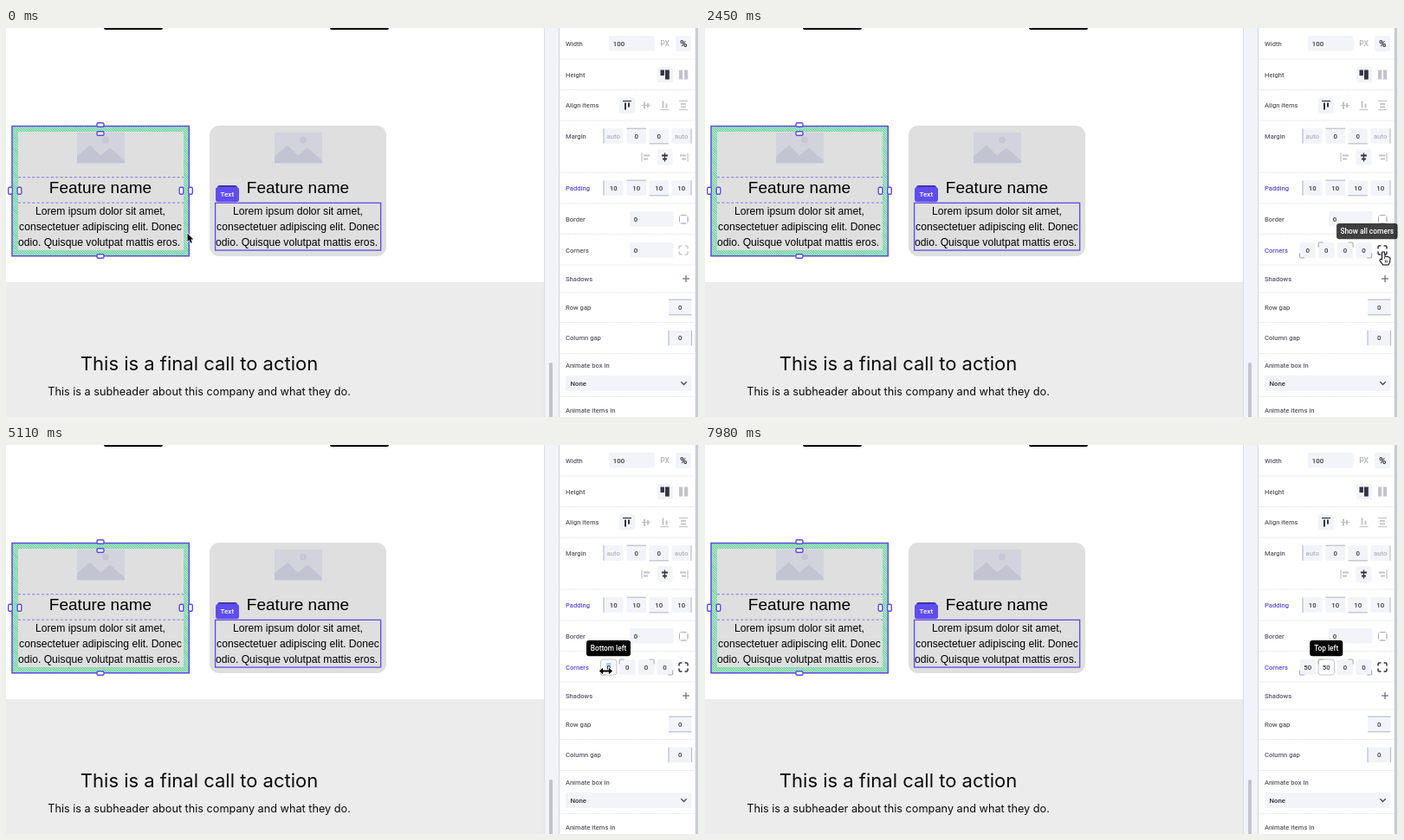
An HTML page with a canvas that plays this animation: 800x450 px, repeating every 8000 ms.

```html
<!DOCTYPE html>
<html lang="en">
<head>
<meta charset="utf-8">
<title>Corner settings</title>
<style>
html, body { margin: 0; width: 100%; height: 100%; overflow: hidden; background: #fff; }
canvas { display: block; width: 800px; height: 450px; }
</style>
</head>
<body>
<canvas id="stage"></canvas>
<script>
const LOOP = 8000;
const PURPLE = '#5b4be0', DARK = '#33343f', PALE = '#c3c4cb', FIELD = '#f3f4f9', EDGE = '#bcbdc8', CARD = '#dfdfdf';
const UI = 'Roboto, sans-serif', BODY = '"Liberation Sans", Arial, sans-serif', TITLE = 'Inter, sans-serif';

const canvas = document.getElementById('stage');
const dpr = window.devicePixelRatio || 1;
canvas.width = 800 * dpr;
canvas.height = 450 * dpr;
const c = canvas.getContext('2d');

const clamp = v => Math.max(0, Math.min(1, v));
const ramp = (t, a, b) => clamp((t - a) / (b - a));
const ease = p => p * p * (3 - 2 * p);
const mix = (a, b, p) => a + (b - a) * p;

function rect(x, y, w, h, fill) {
  c.fillStyle = fill;
  c.fillRect(x, y, w, h);
}

function box(x, y, w, h, r, fill, stroke, width = 1) {
  c.beginPath();
  c.roundRect(x, y, w, h, r);
  if (fill) { c.fillStyle = fill; c.fill(); }
  if (stroke) { c.strokeStyle = stroke; c.lineWidth = width; c.stroke(); }
}

function line(points, color, width = 1, dash = []) {
  c.beginPath();
  points.forEach(([x, y], i) => i ? c.lineTo(x, y) : c.moveTo(x, y));
  c.strokeStyle = color;
  c.lineWidth = width;
  c.setLineDash(dash);
  c.stroke();
  c.setLineDash([]);
}

function shape(points, fill, stroke, width = 1) {
  c.beginPath();
  points.forEach(([x, y], i) => i ? c.lineTo(x, y) : c.moveTo(x, y));
  c.closePath();
  c.lineJoin = 'round';
  if (stroke) { c.strokeStyle = stroke; c.lineWidth = width; c.stroke(); }
  c.fillStyle = fill;
  c.fill();
}

function text(s, x, y, font, color, align = 'center') {
  c.font = font;
  c.fillStyle = color;
  c.textAlign = align;
  c.fillText(s, x, y);
}

const label = (s, y, color = '#5a5b66') => text(s, 646, y + 2.7, '500 7.6px ' + UI, color, 'left');
const value = (s, x, y, color = DARK) => text(s, x, y + 2.8, '500 7.8px ' + UI, color);

// ---- page canvas ----

function placeholder(x, y) {
  c.save();
  c.beginPath();
  c.rect(x, y, 55, 36);
  c.clip();
  rect(x, y, 55, 36, '#d2d3dc');
  shape([[x, y + 36], [x, y + 28], [x + 15, y + 15], [x + 27, y + 27], [x + 38, y + 18], [x + 55, y + 33], [x + 55, y + 36]], '#c3c4d2');
  c.beginPath();
  c.arc(x + 33, y + 9, 4, 0, Math.PI * 2);
  c.fillStyle = '#c6c7d4';
  c.fill();
  c.restore();
}

function cardText(x) {
  text('Feature name', x, 190.7, '19px ' + BODY, '#000');
  ['Lorem ipsum dolor sit amet,', 'consectetuer adipiscing elit. Donec', 'odio. Quisque volutpat mattis eros.']
    .forEach((s, i) => text(s, x - (i === 2 ? 1.5 : 0), 215.9 + i * 18, '12.17px ' + BODY, '#000'));
}

function hatch() {
  c.save();
  c.beginPath();
  c.rect(7, 114, 204, 150);
  c.rect(14, 120, 191, 137);
  c.clip('evenodd');
  rect(7, 114, 204, 150, '#d3ebdd');
  for (let x = -150; x < 215; x += 2.8) line([[x, 114], [x + 150, 264]], '#63d39b', 1.1);
  c.restore();
}

function handle(x, y, w, h) {
  box(x - w / 2, y - h / 2, w, h, 1.5, '#fff', PURPLE, 1.4);
}

function page() {
  rect(0, 0, 622, 450, '#fff');
  box(113, -8, 68, 10, 2, '#000');
  box(374, -8, 68, 10, 2, '#000');
  rect(0, 294, 622, 156, '#ececec');

  rect(7, 114, 204, 150, CARD);
  placeholder(82, 120.5);
  hatch();
  box(7, 113.6, 204.3, 150.2, 0, null, PURPLE, 1.5);
  for (const y of [172.7, 202.2]) line([[14, y], [205, y]], '#8278e4', 1, [3, 2.4]);
  cardText(109);
  for (const y of [112, 122, 264]) handle(109, y, 8, 4.6);
  for (const x of [5, 15.5, 202.5, 213]) handle(x, 188.3, 4.6, 8);

  box(235, 113, 204, 151, 11, CARD);
  placeholder(310, 120.5);
  cardText(337);
  box(241.6, 202.4, 191, 54.8, 0, null, PURPLE, 1.3);
  box(244, 182, 23, 8, 2.5, '#4034a8');
  box(242, 184, 27, 17.2, 3, '#5f4df0');
  text('Text', 255.3, 195.4, '500 8px ' + UI, '#fff');

  text('This is a final call to action', 223, 396, '22px ' + TITLE, '#0c0c0c');
  text('This is a subheader about this company and what they do.', 223, 425, '12.7px ' + TITLE, '#0c0c0c');

  rect(621, 0, 17, 450, '#f2f3f9');
  rect(621, 0, 1, 450, '#dcdde5');
  box(627, 387, 4, 70, 2, '#c2c3cc');
  rect(638, 0, 1, 450, '#d3d4dd');
}

// ---- settings panel ----

// sides: any of l, t, b, r get a marker line
function field(x, y, w, s, sides = '', color = DARK) {
  box(x, y - 8.8, w, 17.6, 2, FIELD);
  const r = x + w, top = y - 8.8, end = y + 8.8;
  if (sides.includes('l')) line([[x, top], [x, end]], EDGE, 1.2);
  if (sides.includes('r')) line([[r, top], [r, end]], EDGE, 1.2);
  if (sides.includes('t')) line([[x, top], [r, top]], EDGE, 1.2);
  if (sides.includes('b')) line([[x, end], [r, end]], EDGE, 1.2);
  value(s, x + w / 2, y, color);
}

function sidesRow(y, values) {
  [690, 716.5, 742.5, 768.5].forEach((x, i) =>
    field(x, y, 22.5, values[i], 'ltbr'[i], values[i] === 'auto' ? '#b4b5bf' : DARK));
}

const chip = (x, y) => box(x - 9, y - 9, 18, 18, 2, FIELD);

// bars hang from, straddle or stand on a rule
function alignIcon(x, y, mode, color) {
  const bar = (bx, h) => {
    const by = mode === 'top' ? y - 3 : mode === 'low' ? y + 3 - h : y - h / 2;
    rect(x + bx, by, 2, h, color);
  };
  const rules = { top: [-5], mid: [0], low: [5], both: [-5, 5] }[mode];
  rules.forEach(d => rect(x - 5, y + d - .6, 10, 1.2, color));
  if (mode === 'both') { rect(x - 3, y - 2.5, 6, 1.8, color); rect(x - 3, y + 1, 6, 1.8, color); }
  else { bar(-3, 8); bar(1, 5); }
}

function sideIcon(x, y, dir, color) {
  rect(x + dir * 5 - .6, y - 5, 1.2, 10, color);
  [[7, -3], [5, 1]].forEach(([w, d]) => {
    const bx = dir < 0 ? x - 3 : dir > 0 ? x + 3 - w : x - w / 2;
    rect(bx, y + d, w, 2, color);
  });
}

function corner(x, y, sx, sy, size, color, width) {
  c.beginPath();
  c.moveTo(x, y - sy * size);
  c.lineTo(x, y - sy * 1.5);
  c.quadraticCurveTo(x, y, x - sx * 1.5, y);
  c.lineTo(x - sx * size, y);
  c.strokeStyle = color;
  c.lineWidth = width;
  c.stroke();
}

function brackets(x, y, color, width) {
  for (const sx of [-1, 1]) for (const sy of [-1, 1]) corner(x + sx * 5, y + sy * 5, sx, sy, 3.4, color, width);
}

function cornerFields(s) {
  const marks = [[-1, 1], [-1, -1], [1, -1], [1, 1]];
  marks.forEach(([sx, sy], i) => {
    const x = 695.7 + i * 21.6, y = 257, on = s.focus === i;
    box(x - 9.2, y - 9, 18.4, 18, 3, on ? '#fff' : FIELD, on ? '#c2c3ce' : s.hover === i ? '#d8d9e2' : null, 1);
    corner(x + sx * 9.2, y + sy * 9, sx, sy, 5.5, '#a9aab6', 1.1);
    if (s.selected === i) rect(x - 2.6, y - 5, 5.2, 10, '#a9cdfb');
    value(s.values[i], x, y);
  });
  brackets(782, 257, DARK, 1.5);
}

function panel(s) {
  rect(639, 0, 161, 450, '#fff');
  for (const y of [36, 71.5, 107, 167, 203, 238.5, 274, 306, 340.5, 376.5, 426.5])
    line([[639, y], [795, y]], '#e3e4ea', 1, [1.5, 1]);

  label('Width', 18);
  box(696, 9, 52.5, 17.5, 2, FIELD);
  value('100', 707.5, 18);
  text('PX', 760.5, 21.2, '500 8.6px ' + UI, '#b3b4be');
  chip(782, 18);
  text('%', 782.3, 22, '700 11.5px ' + UI, DARK);

  label('Height', 54);
  chip(761, 54);
  rect(755.5, 48.5, 4.4, 6.5, DARK);
  rect(761, 48.5, 4.8, 11, DARK);
  rect(777, 48.5, 4.2, 11, PALE);
  rect(783, 48.5, 4.2, 11, PALE);

  label('Align items', 89.5);
  chip(717, 89.5);
  alignIcon(717, 89.5, 'top', DARK);
  alignIcon(739, 89.5, 'mid', PALE);
  alignIcon(760.5, 89.5, 'low', PALE);
  alignIcon(782, 89.5, 'both', PALE);

  label('Margin', 125);
  sidesRow(125, ['auto', '0', '0', 'auto']);
  chip(760.5, 149.5);
  sideIcon(739, 149.5, -1, PALE);
  sideIcon(760.5, 149.5, 0, DARK);
  sideIcon(782, 149.5, 1, PALE);

  label('Padding', 185, PURPLE);
  sidesRow(185, ['10', '10', '10', '10']);

  label('Border', 221);
  box(720, 212, 50.5, 17.6, 2, FIELD);
  value('0', 727, 221);
  box(777.5, 216.5, 9.5, 9.5, 1.5, null, '#d9dae0', 1);
  for (const [x, y, w, h] of [[779.5, 216, 5.5, 1], [779.5, 225.5, 5.5, 1], [777, 218.5, 1, 5.5], [786.5, 218.5, 1, 5.5]])
    rect(x, y, w, h, '#a7a8b2');

  label('Corners', 257, s.open ? PURPLE : undefined);
  if (s.open) cornerFields(s);
  else {
    box(720, 248, 50.5, 17.6, 2, FIELD);
    value('0', 727, 257);
    brackets(782, 257, '#b5b6bf', 1.1);
  }

  label('Shadows', 290);
  rect(781, 289.4, 8, 1.2, '#6b6c77');
  rect(784.4, 286, 1.2, 8, '#6b6c77');

  label('Row gap', 323);
  field(765, 323, 26.5, '0', 'tb');
  label('Column gap', 358.5);
  field(765, 358.5, 26.5, '0', 'lr');

  label('Animate box in', 390.5);
  box(646, 402, 145.5, 18, 2, FIELD);
  text('None', 651.5, 413.8, '500 7.8px ' + UI, DARK, 'left');
  line([[779.3, 409.3], [782.5, 412.6], [785.7, 409.3]], '#4c4d58', 1.4);
  label('Animate items in', 442.5);

  rect(795, 0, 5, 450, '#f0f1f5');
  box(796, -4, 3, 458, 1.5, '#c9cad2');
}

function tooltip(s, x, w, alpha) {
  if (alpha <= 0) return;
  c.globalAlpha = alpha;
  box(x - w / 2, 226, w, 18.2, 3, '#000');
  c.globalAlpha = 1;
  c.save();
  c.globalAlpha = Math.min(1, alpha * 2);
  text(s, x, 238.1, '500 8.3px ' + UI, '#fff');
  c.restore();
}

// ---- pointer ----

const pointers = {
  arrow() {
    shape([[0, 0], [0, 9.6], [2.2, 7.7], [3.7, 11.2], [5.3, 10.5], [3.8, 7.1], [6.7, 6.9]], '#000', '#fff', 1.4);
  },
  press() {
    shape([[0, 0], [2.2, 13], [5.2, 9], [11.2, 7.6]], '#000', '#fff', 1.4);
  },
  hand() {
    shape([[-1, 0], [1, 0], [1.6, 5], [6.6, 6], [7.6, 7.4], [7, 11.4], [5.6, 14], [0, 14], [-3.6, 9.6], [-3, 8.2], [-1, 9]], '#fff', '#000', 2);
    for (const x of [2.4, 4.2]) line([[x, 9], [x, 12]], '#000', .8);
    line([[1.6, 5], [1.6, 7.4]], '#000', .8);
  },
  resize() {
    const pts = [[-7.6, 0], [-3.4, -3.8], [-3.4, -1], [3.4, -1], [3.4, -3.8], [7.6, 0], [3.4, 3.8], [3.4, 1], [-3.4, 1], [-3.4, 3.8]];
    shape(pts, '#000', '#fff', 1.4);
  }
};

function pointer(t) {
  if (t >= 7540) return;
  let x = mix(209.5, 785.5, ease(ramp(t, 140, 1120)));
  let y = mix(237.5, 250.5, ease(ramp(t, 140, 1120)));
  const back = ease(ramp(t, 2480, 3080));
  const next = ease(ramp(t, 5850, 6190));
  let kind = t < 1120 ? 'arrow' : t < 1540 ? 'press' : 'hand';
  if (t >= 1540) {
    x = mix(783, 692.5, back) + 26 * next;
    y = mix(259.5, 261.5, back);
    if (x < 773) kind = 'resize';
  }
  c.save();
  c.translate(x, y);
  pointers[kind]();
  c.restore();
}

function clickRing(t) {
  const p = ramp(t, 1190, 1500);
  if (p <= 0 || p >= 1) return;
  c.save();
  c.globalAlpha = Math.min(1, (1 - p) * 1.7);
  c.beginPath();
  c.arc(783.5, 251.5, 4 + 22 * (1 - (1 - p) ** 2.4), 0, Math.PI * 2);
  c.fillStyle = 'rgba(190,208,250,.16)';
  c.fill();
  c.strokeStyle = '#a9bdf0';
  c.lineWidth = 1.1;
  c.stroke();
  c.restore();
}

// ---- timeline ----

const typed = (t, a, b) => t < a ? '0' : t < b ? '5' : '50';

function state(t) {
  return {
    open: t >= 1470,
    focus: t >= 6860 ? 1 : t >= 3640 ? 0 : -1,
    hover: t >= 6060 ? 1 : t >= 2960 ? 0 : -1,
    selected: t >= 7000 && t < 7560 ? 1 : t >= 4000 && t < 5390 ? 0 : -1,
    values: [typed(t, 5390, 5530), typed(t, 7560, 7700), '0', '0']
  };
}

function draw(now) {
  const t = now % LOOP;
  c.setTransform(dpr, 0, 0, dpr, 0, 0);
  page();
  panel(state(t));
  tooltip('Show all corners', 764.3, 70.5, ramp(t, 1750, 1890) * (1 - ramp(t, 2400, 2600)));
  tooltip('Bottom left', 695.5, 51, ramp(t, 3000, 3180) * (1 - ramp(t, 5900, 6080)));
  tooltip('Top left', 717.2, 38, ramp(t, 6150, 6320));
  clickRing(t);
  pointer(t);
}

let start = null;
function tick(now) {
  if (start === null) start = now;
  draw(now - start);
  requestAnimationFrame(tick);
}
draw(0);
requestAnimationFrame(tick);
</script>
</body>
</html>
```
